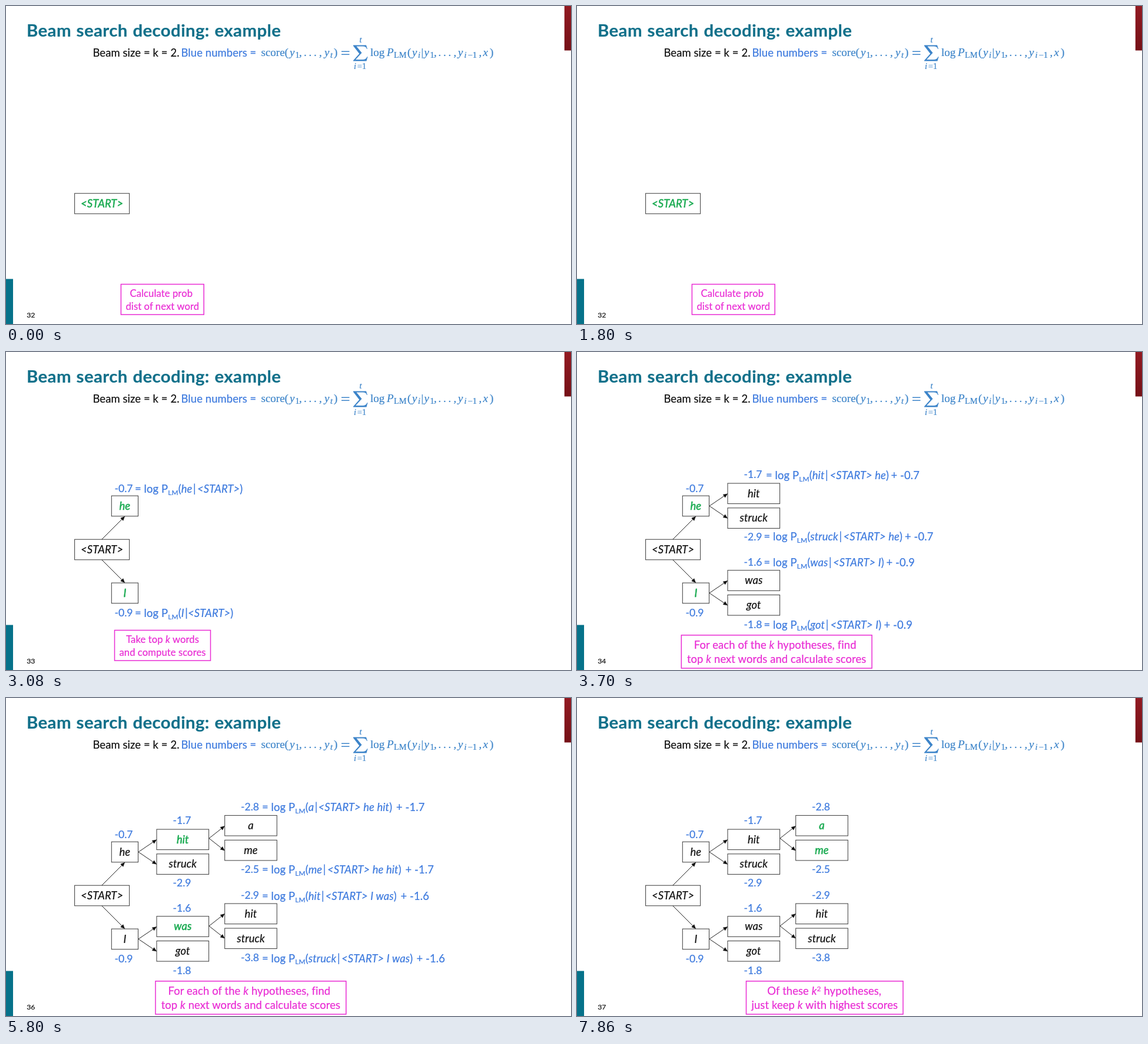
These frames come from a looping animation (960 by 540 pixels, 8000 ms). An HTML page:

```html
<!DOCTYPE html>
<html lang="en">
<head>
<meta charset="utf-8">
<title>Beam search decoding</title>
<style>
  html, body { margin: 0; width: 100%; height: 100%; overflow: hidden; background: #fff; }
  svg { display: block; width: 960px; height: 540px; }
  text {
    font: 18.4px Lato, sans-serif; letter-spacing: .006em; white-space: pre;
    color: #111; fill: currentColor; stroke: currentColor; stroke-width: .22px;
  }
  .title { font-size: 29.4px; font-weight: 700; letter-spacing: .013em; word-spacing: .04em; color: #12708a; }
  .page { font-size: 12.2px; letter-spacing: 0; }
  .blue { color: #3d7ade; }
  .num { font-size: 17.6px; letter-spacing: 0; }
  .note { color: #e92cd4; }
  .small { font-size: 16.6px; }
  .mid { text-anchor: middle; }
  .end { text-anchor: end; }
  .it { font-style: italic; }
  .on { color: #1bab52; stroke-width: .55px; }
  .sub { font-size: 12px; }
  .math text { font-family: "Liberation Serif", serif; letter-spacing: 0; color: #3c84c9; }
  .box { fill: #fff; stroke: #3a3a3a; stroke-width: 1; }
  .frame { fill: #fff; stroke: #e92cd4; stroke-width: 1.5; }
  .line { stroke: #222; stroke-width: 1; }
</style>
</head>
<body>
<svg viewBox="0 0 960 540">
  <defs>
    <linearGradient id="red" x1="0" y1="0" x2="0" y2="1">
      <stop offset="0" stop-color="#921a22"/><stop offset="1" stop-color="#751117"/>
    </linearGradient>
  </defs>
  <rect width="960" height="540" fill="#fff"/>
  <rect y="463.5" width="12" height="76.5" fill="#06728a"/>
  <rect x="948.8" width="11.2" height="75.5" fill="url(#red)"/>
  <text class="title" x="35" y="52.3">Beam search decoding: example</text>
  <text x="147.5" y="85.5">Beam size = k = 2.</text>
  <text class="blue" x="297.5" y="85.5">Blue numbers =</text>
  <g id="formula" class="math"></g>
  <g id="slide"></g>
</svg>
<script>
const LOOP = 8000;
const starts = [0, 2900, 3540, 4620, 5780, 6900];

const text = (s, x, y, cls = '') => `<text class="${cls}" x="${x}" y="${y}">${s}</text>`;
const it = s => `<tspan class="it">${s}</tspan>`;
const START = '&lt;START&gt;';

// Each entry: [string, x]
function drawFormula() {
  const put = (list, y, size, italic) => list.map(([s, x]) =>
    `<text x="${x}" y="${y}" style="font-size:${size}px;font-style:${italic ? 'italic' : 'normal'}">${s}</text>`).join('');
  const upright = [['score(', 433.5], [',', 498], ['.', 506], ['.', 514.5], ['.', 523], [',', 532], [')', 557],
    ['log', 619], ['(', 682], ['|', 705.5], [',', 727], ['.', 734.5], ['.', 743], ['.', 751.5], [',', 760.5],
    [',', 803.5], [')', 822]];
  const slanted = [['y', 482], ['y', 541], ['P', 647], ['y', 690], ['y', 710.5], ['y', 768], ['x', 810.5]];
  return put(upright, 85, 19, false) + put(slanted, 85, 19, true) +
    put([['1', 491.5], ['LM', 659], ['1', 720.5], ['−1', 784.5]], 88, 14.5, false) +
    put([['t', 551], ['i', 700], ['i', 778.5]], 88, 14.5, true) +
    put([['t', 600.5]], 62, 14.5, true) + put([['i', 591]], 106.5, 14.5, true) +
    put([['=1', 597]], 106.5, 14, false) +
    '<path fill="#3c84c9" d="M570 76.6H583.5V78H570ZM570 81.6H583.5V83H570ZM590 66.5H612L614 73H613Q612 68.6 606 68.6H595.5L604.5 79.5 594 91H606Q612 91 613.6 86H614.6L612.5 93.5H590V92.5L600.3 81 590 67.7Z"/>';
}

function arrow(x1, y1, x2, y2) {
  const deg = Math.atan2(y2 - y1, x2 - x1) * 180 / Math.PI;
  return `<path class="line" d="M${x1} ${y1}L${x2} ${y2}"/>` +
    `<path d="M0 0L-7.5 -3.4V3.4Z" fill="#111" transform="translate(${x2} ${y2}) rotate(${deg})"/>`;
}

function node(word, x, y, w, on) {
  return `<rect class="box" x="${x}" y="${y}" width="${w}" height="34.6"/>` +
    text(word, x + w / 2, y + 23.5, 'mid it' + (on ? ' on' : ''));
}

const score = (s, x, y) => text(s, x, y, 'blue num mid');

// "= log P(word|<START> rest) + prev"; the context begins at xs, the tail ends at xEnd
function logProb(x, y, word, xs, rest, tail, xEnd) {
  const head = `= log P<tspan class="sub" dy="3.5">LM</tspan><tspan dy="-3.5">(</tspan>${it(word)}<tspan dx="1.5">|</tspan>`;
  return text(head, x, y, 'blue') + text(it(START + rest) + ')', xs, y, 'blue') +
    (tail ? text('+ ' + tail, xEnd, y, 'blue end') : '');
}

function note(x, y, w, h, lines, ys, shift = 0, cls = '') {
  const c = x + w / 2;
  return `<rect class="frame" x="${x}" y="${y}" width="${w}" height="${h}"/>` +
    lines.map((s, i) => text(s, c - (i ? 0 : shift), ys[i], 'note mid ' + cls)).join('');
}
const smallNote = (x, w, a, b, shift) => note(x, 472.5, w, 51.5, [a, b], [494, 515.5], shift, 'small');
const bigNote = (x, w, a, b, shift) => note(x, 480.8, w, 56.2, [a, b], [504.3, 528.4], shift);
const expandNote = x => bigNote(x, 323.8, `For each of the ${it('k')} hypotheses, find`,
  `top ${it('k')} next words and calculate scores`, 2.5);
const keepNote = x => bigNote(x, 266.5,
  `Of these ${it('k')}<tspan class="sub" dy="-6">2</tspan><tspan dy="6"> hypotheses,</tspan>`,
  `just keep ${it('k')} with highest scores`, .5);

const root = on => node(START, 116.6, 318.2, 93, on);
const level1 = on => arrow(163, 318, 202, 279) + arrow(163, 353, 202, 392) +
  node('he', 179.3, 244.2, 45.2, on) + node('I', 179.3, 392.1, 45.2, on) +
  score('-0.7', 200, 238.4) + score('-0.9', 200, 449.2);

// Two branches from one parent box
const fork = (x1, x2, y) => arrow(x1, y, x2, y - 21) + arrow(x1, y, x2, y + 21);

const level2 = on => fork(225, 256, 261.5) + fork(225, 256, 409.3) +
  node('hit', 256, 223, 88.6, on) + node('struck', 256, 264.8, 88.6) +
  node('was', 256, 370.7, 88.6, on) + node('got', 256, 412.5, 88.6) +
  score('-1.7', 299, 214.4) + score('-2.9', 299, 319.8) + score('-1.6', 299, 362.6) + score('-1.8', 299, 468.8);

const level3 = on => fork(345, 371.7, 238.3) + fork(345, 371.7, 387.2) +
  node('a', 371.7, 199.4, 88.6, on) + node('me', 371.7, 241.3, 88.6, on) +
  node('hit', 371.7, 349.1, 88.6) + node('struck', 371.7, 391, 88.6) +
  score('-2.8', 414.5, 191) + score('-2.5', 414.5, 297.4) + score('-2.9', 414.5, 341.4) + score('-3.8', 414.5, 447.4);

const slides = [
  () => root(true) + smallNote(195.4, 140.8, 'Calculate prob', 'dist of next word', 2),
  () => root() + level1(true) +
    logProb(219, 239, 'he', 325, '') + logProb(219, 450, 'I', 309, '') +
    smallNote(184.5, 163, `Take top ${it('k')} words`, 'and compute scores', 0),
  () => root() + level1(true) + level2() +
    logProb(321, 216, 'hit', 429.5, ' he', '-0.7', 582) +
    logProb(317.5, 320.3, 'struck', 452.5, ' he', '-0.7', 605.5) +
    logProb(317.5, 364, 'was', 435, ' I', '-0.9', 574) +
    logProb(317.5, 469.5, 'got', 430.5, ' I', '-0.9', 570) + expandNote(177.3),
  () => root() + level1() + level2(true) + keepNote(206),
  () => root() + level1() + level2(true) + level3() +
    logProb(435, 192, 'a', 530.5, ' he hit', '-1.7', 711.5) +
    logProb(435, 298.2, 'me', 546, ' he hit', '-1.7', 727) +
    logProb(435, 343, 'hit', 542.5, ' I was', '-1.6', 719) +
    logProb(435, 448.6, 'struck', 570, ' I was', '-1.6', 746) + expandNote(254),
  () => root() + level1() + level2() + level3(true) + keepNote(287.5)
];

document.getElementById('formula').innerHTML = drawFormula();
const stage = document.getElementById('slide');
let shown = -1;

function tick() {
  const t = performance.now() % LOOP;
  const i = starts.filter(s => s <= t).length - 1;
  if (i !== shown) {
    stage.innerHTML = slides[i]() + text(32 + i, 35.2, 528.8, 'page');
    shown = i;
  }
  requestAnimationFrame(tick);
}
tick();
</script>
</body>
</html>
```
